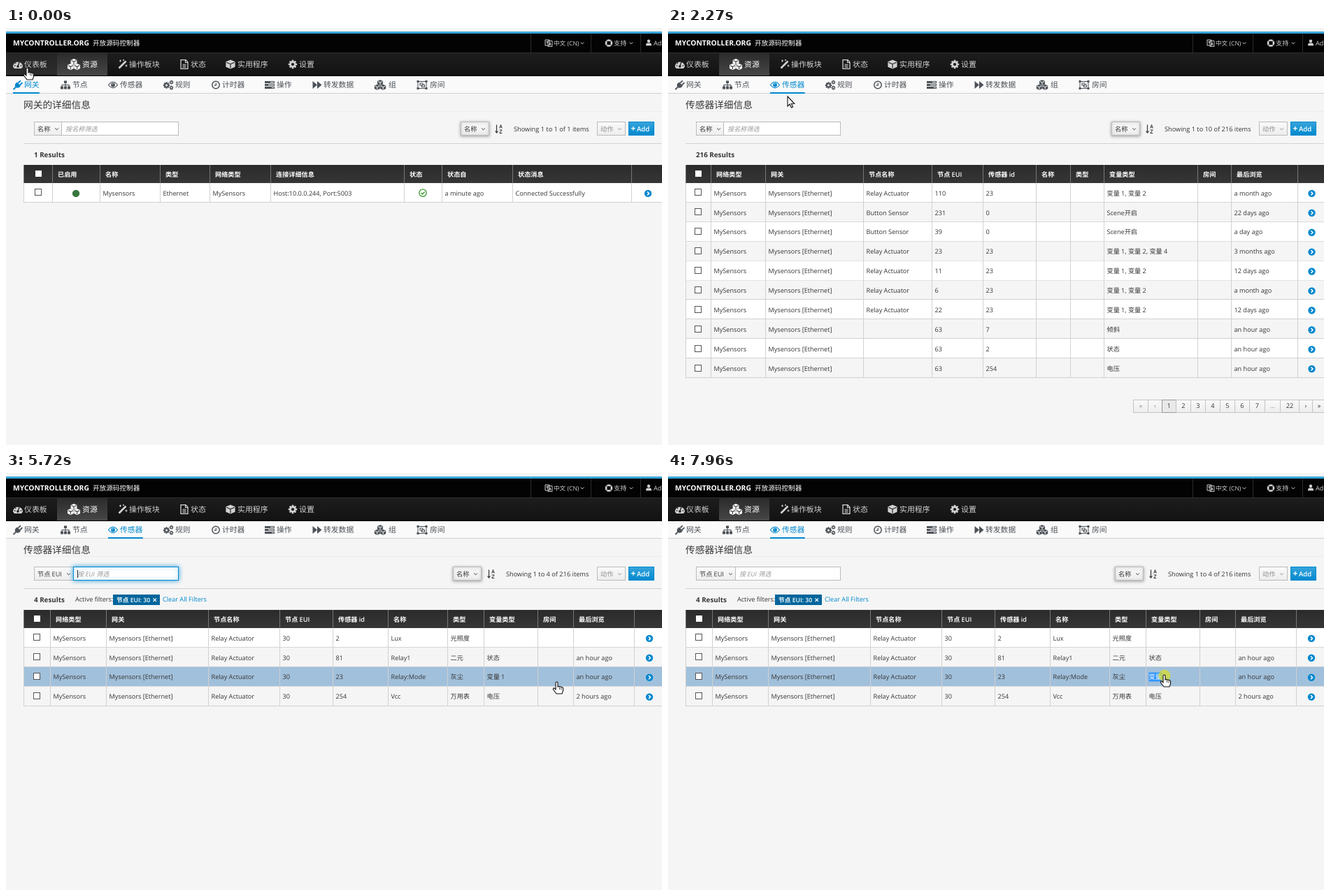
Write an HTML page with a canvas that moves like this. It is 938 px wide and 597 px high and loops after 8 s.

```html
<!DOCTYPE html>
<html lang="en">
<head>
<meta charset="utf-8">
<title>Controller dashboard</title>
<style>
html, body { margin: 0; width: 100%; height: 100%; overflow: hidden; background: #f5f5f5; }
canvas { display: block; }
</style>
</head>
<body>
<canvas id="stage" width="938" height="597"></canvas>
<script>
const ctx = document.getElementById('stage').getContext('2d');
const FONT = '"Open Sans", "Noto Sans CJK SC", "Noto Sans CJK", sans-serif';
const BLUE = '#0088ce', INK = '#363636', LINE = '#d1d1d1', PAGE = '#f5f5f5';
const LOOP = 8000, ROW = 27.9, TOP = 222;

// The screen refreshes only at these moments.
const ticks = [0, 200, 430, 830, 1040, 1240, 1450, 1650, 1870,
  2070, 2270, 2470, 2670, 2870, 3070, 3280, 3480, 3680, 3880, 4080, 4280,
  4720, 4920, 5120, 5320, 5520, 5720, 5920, 6140, 6340, 6540, 6740, 6940,
  7140, 7340, 7540, 7750, 7960];

// Pointer path: time, x, y
const path = [[0, 31, 57], [430, 31, 57], [1040, 109, 56], [1240, 109, 56], [1650, 172, 87],
  [2070, 172, 87], [2270, 171, 98], [2670, 62, 146], [3070, 84, 223], [3280, 84, 223],
  [3880, 127, 145], [4720, 127, 145], [5720, 788, 299], [6140, 842, 292], [6340, 842, 292],
  [6740, 719, 270], [6940, 708, 287], [7340, 690, 289], [7540, 690, 289], [7960, 710, 289]];

const clicks = [200, 1240, 1870, 2670, 3070, 3880];

// Icon layers: path, line width (0 = fill), true = knocked out in the background colour
const circle = (r, x = 0, y = 0) => `M${x - r} ${y}a${r} ${r} 0 1 0 ${2 * r} 0a${r} ${r} 0 1 0 ${-2 * r} 0`;
const hex = (x, y, r) => `M${x} ${y - r}l${r} ${r * .45}v${r * 1.1}l${-r} ${r * .45}l${-r} ${-r * .45}v${-r * 1.1}z`;
const edges = (x, y, r) => `M${x - r} ${y - r * .5}l${r} ${r * .45}l${r} ${-r * .45}M${x} ${y}v${r}`;
const gear = (x, y, r) => {
  const d = r * .7;
  return [[`M${x} ${y - r}v${2 * r}M${x - r} ${y}h${2 * r}M${x - d} ${y - d}l${2 * d} ${2 * d}M${x - d} ${y + d}l${2 * d} ${-2 * d}`, r * .42],
    [circle(r * .75, x, y), 0], [circle(r * .34, x, y), 0, true]];
};
const trio = [[0, -3.3], [-4.2, 3.2], [4.2, 3.2]];
const icons = {
  gauge: [['M-7 3.5A7 7 0 1 1 7 3.5L5 6H-5Z', 0], ['M0 3L2-3M-5 2h1.4M3.8 2h1.4M-3.8-2l1 1M0-4.6v1.2', 1.3, true], [circle(1.7, 0, 3), 0, true]],
  cubes: [...trio.map(([x, y]) => [hex(x, y, 4), 0]), ...trio.map(([x, y]) => [edges(x, y, 3.2), 1, true])],
  cube: [[hex(0, 0, 6.6), 0], [edges(0, 0, 5.6), 1.1, true]],
  wand: [['M-5.5 5.5L4.5-4.5', 2.6], ['M-3.5-6.5v3M-5-5h3M1-7v2M0-6h2M5 .5v3M3.5 2h3', 1.1]],
  file: [['M-5-6.3H2L5-3V6.3H-5Z', 1.3], ['M1.5-6V-2.5H5M-2.5 .2h5M-2.5 2.2h5M-2.5 4.2h5', 1.1]],
  cog: gear(0, 0, 6.2),
  cogs: [...gear(-2.5, .5, 4.7), ...gear(4.5, -3.8, 2.9), ...gear(4.5, 4, 2.9)],
  plug: [['M-6.5 6.5L-3 3', 1.8], ['M-4 2Q-5-2-1-4L4 1Q2 5-2 4Z', 0], ['M.5-3L4-6.2M3 0L6.5-3.3', 1.8]],
  sitemap: [['M-2-6h4v3.5h-4zM-7 2h4v4h-4zM-2 2h4v4h-4zM3 2h4v4h-4z', 0], ['M0-3V3M-5 3V0H5V3', 1.1]],
  eye: [['M-6.5 0Q0-8.5 6.5 0Q0 8.5-6.5 0Z', 1.2], [circle(2.9), 0], ['M-1.2-.4Q-1-1.4.2-1.5', .9, true]],
  clock: [[circle(5.2), 1.5], ['M.3-3V.7H-2.5', 1.2]],
  tasks: [['M-7-5.5H7v3H-7zM-7-1.5H7v3H-7zM-7 2.5H7v3H-7z', 0], ['M1-4h5M-2 0h8M3 4h3', 1, true]],
  forward: [['M-6.5-5.5L0 0L-6.5 5.5ZM0-5.5L6.5 0L0 5.5Z', 0]],
  group: [['M-6-5H6V5H-6Z', 1], ['M-7.5-6.5h3v3h-3zM4.5-6.5h3v3h-3zM-7.5 3.5h3v3h-3zM4.5 3.5h3v3h-3z', 0], ['M-3-2.5h4v3h-4zM-.5 0h4v3h-4z', 1.1]],
  lang: [['M-5-4H1V4H-5Z', 1], ['M-1-2.5H5V5.5H-1ZM-3.5-1h3M-2-2.5V1.5M.8 4L2 0l1.2 4', .9]],
  ring: [[circle(4), 2.6], ['M-3.6-3.6l2 2M3.6-3.6l-2 2M-3.6 3.6l2-2M3.6 3.6l-2-2', 1, true]],
  user: [[circle(2.2, 0, -2.2), 0], ['M-4 4.2Q-4 .6-1.8 .6H1.8Q4 .6 4 4.2Z', 0]],
  sort: [['M-3-6V5M-5 3L-3 5.6L-1 3', 1.2], ['M1.2-1L3-6L4.8-1M1.8-2.6h2.4M1.2 1.5H4.6L1.2 6H4.8', 1]],
  check: [[circle(5.2), 1.4], ['M-2.4 0L-.6 1.8L2.6-1.6', 1.5]],
  go: [[circle(5.2), 0], ['M-1-2.5L1.5 0L-1 2.5', 1.5, true]],
  down: [['M-2.3-1L0 1.3L2.3-1', 1]],
  hand: [['M-2 1Q-.5-1 1 1V7Q2.5 5.5 3.5 7.2Q5 6 6 7.8Q8 7 8.5 9V13L7 17H-1L-5.5 11Q-6 8.5-4 9L-2 11Z', 0], ['M3.6 8v3M6 8.5v3', .8, true]],
  arrow: [['M0 0V14L3.2 11L5.4 16L7.6 15L5.4 10.3H9.8Z', 0]],
};

function icon(name, x, y, color, bg = PAGE, scale = 1) {
  ctx.save();
  ctx.translate(x, y);
  ctx.scale(scale, scale);
  for (const [d, width, knock] of icons[name]) {
    const shape = new Path2D(d);
    ctx.fillStyle = ctx.strokeStyle = knock ? bg : color;
    ctx.lineWidth = width;
    width ? ctx.stroke(shape) : ctx.fill(shape);
  }
  ctx.restore();
}

function text(s, x, y, color = INK, size = 9.15, style = '', align = 'left') {
  ctx.font = `${style} ${size}px ${FONT}`;
  ctx.fillStyle = color;
  ctx.textAlign = align;
  ctx.fillText(s, x, y + size * .36);
}

function box(x, y, w, h, fill, border) {
  ctx.fillStyle = fill;
  ctx.fillRect(x, y, w, h);
  if (border) {
    ctx.strokeStyle = border;
    ctx.lineWidth = 1;
    ctx.strokeRect(x + .5, y + .5, w - 1, h - 1);
  }
}

function fade(y, h, a, b) {
  const g = ctx.createLinearGradient(0, y, 0, y + h);
  g.addColorStop(0, a);
  g.addColorStop(1, b);
  return g;
}

function glow(color, blur, draw, dy = 0) {
  ctx.save();
  ctx.shadowColor = color;
  ctx.shadowBlur = blur;
  ctx.shadowOffsetY = dy;
  draw();
  ctx.restore();
}

function button(x, w, label, color = INK, lifted = false) {
  const draw = () => box(x, 134, w, 20, fade(134, 20, '#fafafa', '#ededed'), '#bbb');
  lifted ? glow('rgba(0,0,0,.3)', 4, draw, 1) : draw();
  text(label, x + 5, 144.5, color);
  icon('down', x + w - 8.5, 144.5, color);
}

const nav = [['gauge', 17, 26, '仪表板'], ['cubes', 97, 109, '资源'], ['wand', 167, 176, '操作板块'],
  ['file', 255, 264, '状态'], ['cube', 321, 331, '实用程序'], ['cog', 410, 419, '设置']];
const subnav = [['plug', 17, 26, '网关'], ['sitemap', 85, 95, '节点'], ['eye', 153, 163, '传感器'],
  ['cogs', 232, 242, '规则'], ['clock', 300, 309, '计时器'], ['tasks', 377, 387, '操作'],
  ['forward', 445, 454, '转发数据'], ['cubes', 535, 547, '组'], ['group', 595, 606, '房间']];

function header(active, hover, outlined) {
  box(0, 5, 938, 3, '#39a5dc');
  box(0, 8, 938, 27, '#030303');
  text('MYCONTROLLER.ORG', 10, 21.5, '#fff', 10.3, '700');
  text('开放源码控制器', 124, 21.5, '#fff', 9.65, '500');
  for (const x of [750, 836, 907]) box(x, 8, 1, 27, '#2b2b2b');
  const pale = '#d1d1d1';
  icon('lang', 776, 21, pale, '#030303');
  text('中文 (CN)', 783, 21.5, pale, 8.6);
  icon('down', 824, 21.5, pale);
  icon('ring', 862, 21.5, pale, '#030303');
  text('支持', 869, 21.5, pale);
  icon('down', 894, 21.5, pale);
  icon('user', 919, 21, pale);
  text('Admin', 926, 21.5, pale);

  box(0, 35, 938, 34, '#030303');
  box(0, 35, 938, 1, '#2e2e2e');
  box(0, 36, 938, 31, fade(36, 31, '#1d1d1d', '#131313'));
  const tabs = [[0, 73], [73, 72]];
  if (hover >= 0) box(tabs[hover][0], 36, tabs[hover][1], 31, fade(36, 31, '#242424', '#2c2c2c'));
  box(tabs[active][0], 36, tabs[active][1], 32, fade(36, 32, '#2b2b2b', '#474747'), outlined && '#aaa');
  nav.forEach(([name, cx, x, label], i) => {
    const color = i == active ? '#fff' : '#d1d1d1';
    icon(name, cx, 52, color, i == active ? '#383838' : '#1a1a1a', name == 'cubes' ? 1.1 : 1);
    text(label, x, 52, color, 10.9, i == active ? '500' : '');
  });
}

function tabs(active, hover) {
  box(0, 69, 938, 25, '#fafafa');
  box(0, 93, 938, 1, LINE);
  subnav.forEach(([name, cx, x, label], i) => {
    const color = i == active ? BLUE : i == hover ? '#222' : '#4d5258';
    icon(name, cx, 81.5, color, '#fafafa');
    text(label, x, 81.5, color, 10.8);
    if (i == active || i == hover)
      box(cx - 7, 92, x - cx + 7 + label.length * 10.9, 2, i == active ? BLUE : '#bbb');
  });
}

function toolbar(title, counter, counterX, results, lifted) {
  text(title, 25, 110, INK, 13.7);
  box(25, 119, 913, 1, '#ececec');
  button(counterX - 76, 41, '名称', INK, lifted);
  icon('sort', counterX - 21.5, 144.5, INK);
  text(counter, counterX, 144.5, INK, 9.23);
  button(845, 41, '动作', '#8b8d8f');
  box(890, 134, 37, 20, fade(134, 20, '#39a5dc', BLUE), BLUE);
  text('+', 893.5, 144, '#fff', 12, '700');
  text('Add', 902, 144.5, '#fff', 9.6, '600');
  box(25, 165, 913, 1, LINE);
  text(results, 40, 181, INK, 9.8, '700');
}

function filter(label, split, value, hint, focus, caret) {
  button(40, split - 39, label);
  const draw = () => box(split - 1, 134, 248 - split, 20, '#fff', focus ? BLUE : '#bbb');
  focus ? glow('rgba(0,136,206,.7)', 6, draw) : draw();
  if (value) text(value, split + 5, 144.5);
  else text(hint, split + 5, 144.5, '#999', 9.15, 'italic');
  if (caret) box(split + 5 + value.length * 5.3, 139, 1, 11, '#222');
}

const checkbox = (x, y) => box(Math.round(x) - 5, Math.round(y) - 6, 10, 10, '#fff', '#555');

// cells[row][col] is text or a function drawing at the middle of the cell
function table(cols, heads, rows, goX, hover = -1) {
  const mid = (cols[0] + cols[1]) / 2, bottom = TOP + rows.length * ROW;
  rows.forEach((cells, r) => {
    const y = TOP + r * ROW;
    box(25, y, 913, ROW, r == hover ? '#a1c0db' : r % 2 ? PAGE : '#fff');
    box(25, Math.round(y + ROW) - 1, 913, 1, LINE);
  });
  box(25, 196, 913, 26, fade(196, 26, '#2b2b2b', '#363636'));
  for (const x of cols) {
    box(Math.round(x), 196, 1, 26, '#777');
    box(Math.round(x), TOP, 1, bottom - TOP, LINE);
  }
  box(Math.round(mid) - 4, 204, 9, 9, '#fff');
  heads.forEach((h, i) => text(h, cols[i + 1] + 8, 209.5, '#fff', 9.15, '600'));
  rows.forEach((cells, r) => {
    const y = TOP + r * ROW + 14.4;
    checkbox(mid, y);
    cells.forEach((cell, i) => {
      if (typeof cell == 'function') cell((cols[i + 1] + cols[i + 2]) / 2, y);
      else text(cell, cols[i + 1] + 4.5, y);
    });
    icon('go', goX, y + .5, BLUE, '#fff');
  });
}

function gateways(late) {
  toolbar('网关的详细信息', 'Showing 1 to 1 of 1 items', 726, '1 Results', !late);
  filter('名称', 80, '', '按名称筛选');
  const cols = late ? [25, 66, 133.5, 218.5, 289.5, 375.5, 565, 618.5, 726, 895]
    : [25, 66, 134, 220, 291, 378, 569, 623, 724, 894];
  const dot = (x, y) => { ctx.fillStyle = '#37783c'; ctx.fill(new Path2D(circle(5.2, x, y + .5))); };
  const ok = (x, y) => icon('check', x, y - .3, '#3f9c35');
  table(cols, ['已启用', '名称', '类型', '网络类型', '连接详细信息', '状态', '状态自', '状态消息'],
    [[dot, 'Mysensors', 'Ethernet', 'MySensors', 'Host:10.0.0.244, Port:5003', ok,
      late ? '2 minutes ago' : 'a minute ago', 'Connected Successfully']], 918);
}

const sensorHeads = ['网络类型', '网关', '节点名称', '节点 EUI', '传感器 id', '名称', '类型', '变量类型', '房间', '最后浏览'];
const owner = ['MySensors', 'Mysensors [Ethernet]'];
const relay = 'Relay Actuator', knob = 'Button Sensor', pair = '变量 1, 变量 2';
const allRows = [
  [relay, '110', '23', pair, 'a month ago'], [knob, '231', '0', 'Scene开启', '22 days ago'],
  [knob, '39', '0', 'Scene开启', 'a day ago'], [relay, '23', '23', '变量 1, 变量 2, 变量 4', '3 months ago'],
  [relay, '11', '23', pair, '12 days ago'], [relay, '6', '23', pair, 'a month ago'],
  [relay, '22', '23', pair, '12 days ago'], ['', '63', '7', '倾斜', 'an hour ago'],
  ['', '63', '2', '状态', 'an hour ago'], ['', '63', '254', '电压', 'an hour ago'],
].map(([node, eui, id, kind, seen]) => [...owner, node, eui, id, '', '', kind, '', seen]);
const foundRows = [['2', 'Lux', '光照度', '', ''], ['81', 'Relay1', '二元', '状态', 'an hour ago'],
  ['23', 'Relay:Mode', '灰尘', '变量 1', 'an hour ago'], ['254', 'Vcc', '万用表', '电压', '2 hours ago'],
].map(([id, name, type, kind, seen]) => [...owner, relay, '30', id, name, type, kind, '', seen]);

function pager() {
  const edge = [665, 686, 706, 726, 747, 768, 789, 810, 831, 853, 875, 902, 921, 940];
  [...'«‹1234567…', '22', '›', '»'].forEach((label, i) => {
    const x = edge[i], w = edge[i + 1] - x, on = label == '1';
    box(x, 532, w + 1, 19, on ? '#e9e9e9' : fade(532, 19, '#fafafa', '#ededed'), on ? '#999' : '#c4c4c4');
    text(label, x + w / 2 + .5, 541, i < 2 || label == '…' ? '#8b8d8f' : INK, 9.2, '', 'center');
  });
}

function menu(y) {
  glow('rgba(0,0,0,.3)', 8, () => box(40, 154, 120, 116, '#fff', '#bbb'), 3);
  ['名称', '传感器 id', '节点名称', '节点 EUI', '类型', '变量类型'].forEach((label, i) => {
    const mid = 167 + i * 18, on = Math.abs(y - mid) < 9;
    if (on) box(41, mid - 9, 119, 18, BLUE);
    text(label, 48, mid, on ? '#fff' : INK);
  });
}

function sensors(t, y) {
  toolbar('传感器详细信息', 'Showing 1 to 10 of 216 items', 710, '216 Results', true);
  table([25, 61, 139, 279, 377, 450, 526, 575, 623, 757, 805, 900], sensorHeads, allRows, 920.5);
  pager();
  if (t < 3280) filter('名称', 80, '', '按名称筛选');
  else filter('节点 EUI', 97, t < 4080 ? '' : t < 4280 ? '3' : '30', '按 EUI 筛选', t >= 3880, t >= 3880);
  if (t >= 2670 && t < 3280) menu(y);
}

function found(t, x, y) {
  toolbar('传感器详细信息', 'Showing 1 to 4 of 216 items', 715, '4 Results', true);
  const focus = t < 7540;
  filter('节点 EUI', 97, '', '按 EUI 筛选', focus, focus && (t - 4650) % 1060 < 530);
  text('Active filters:', 99, 181);
  box(153, 174, 67, 15, '#00659c');
  text('节点 EUI: 30', 158, 181.5, '#fff', 8.7, '600');
  text('✕', 212.5, 181.5, '#fff', 8.5, '700', 'center');
  text('Clear All Filters', 224, 181, BLUE);
  const hover = Math.floor((y - TOP) / ROW);
  table([25, 63, 143, 289, 391, 467, 546, 631, 683, 760, 811, 898], sensorHeads, foundRows, 920, hover);
  if (t >= 7540 && x > 692) {
    ctx.save();
    ctx.beginPath();
    ctx.rect(687.5, 285.5, x - 691.5, 13);
    ctx.clip();
    box(687, 285, 40, 14, '#3297fd');
    text('变量 1', 687.5, TOP + 2 * ROW + 14.4, '#fff');
    ctx.restore();
  }
  if (t >= 6140 && t < 6940) tooltip(t < 6740 ? .9 : .22);
}

function tooltip(alpha) {
  ctx.save();
  ctx.globalAlpha = alpha;
  ctx.fillStyle = '#222';
  ctx.fill(new Path2D('M680 280H807V287L811 291.5L807 296V303H680Z'));
  ctx.globalAlpha = Math.min(1, alpha * 4);
  text('Aug 09, 2019 12:22:49 PM', 743, 292, '#fff', 8.8, '600', 'center');
  ctx.restore();
}

function pointer(t, x, y) {
  if (clicks.includes(t) || t >= 7540) {
    ctx.fillStyle = 'rgba(225,225,20,.65)';
    ctx.fill(new Path2D(circle(8.5, x, y + 1)));
  }
  if (x > 97 && x < 247 && y > 134 && y < 154) {
    ctx.strokeStyle = '#111';
    ctx.lineWidth = 1.2;
    ctx.stroke(new Path2D(`M${x - 3} ${y - 6}h2.2l.8 1l.8-1h2.2M${x} ${y - 5}v10M${x - 3} ${y + 6}h2.2l.8-1l.8 1h2.2`));
    return;
  }
  const name = y < 95 || y > TOP || (t < 3280 && y > 134) ? 'hand' : 'arrow';
  icon(name, x, y, '#fff', '#111');
  ctx.strokeStyle = '#111';
  ctx.lineWidth = 1.1;
  ctx.save();
  ctx.translate(x, y);
  ctx.stroke(new Path2D(icons[name][0][0]));
  ctx.restore();
}

function pointerAt(t) {
  const i = path.findIndex(p => p[0] > t);
  if (i < 0) return path.at(-1).slice(1);
  const [t0, x0, y0] = path[i - 1], [t1, x1, y1] = path[i];
  const k = (t - t0) / (t1 - t0);
  return [x0 + (x1 - x0) * k, y0 + (y1 - y0) * k];
}

function draw(now) {
  const time = now % LOOP, t = ticks.findLast(v => v <= time);
  const [x, y] = pointerAt(t);
  const home = t >= 430 && t < 1240;
  ctx.textRendering = 'geometricPrecision';
  box(0, 0, 938, 597, PAGE);
  header(home ? 0 : 1, t < 430 ? 0 : home && x > 73 ? 1 : -1, t >= 1240 && t < 2070);
  if (!home) {
    tabs(t < 2070 ? 0 : 2, t >= 1650 && t < 2070 ? 2 : -1);
    if (t < 2070) gateways(t >= 1240);
    else if (t < 4720) sensors(t, y);
    else found(t, x, y);
  }
  pointer(t, x, y);
}

const start = performance.now();
function loop() {
  draw(performance.now() - start);
  requestAnimationFrame(loop);
}
loop();
</script>
</body>
</html>
```
